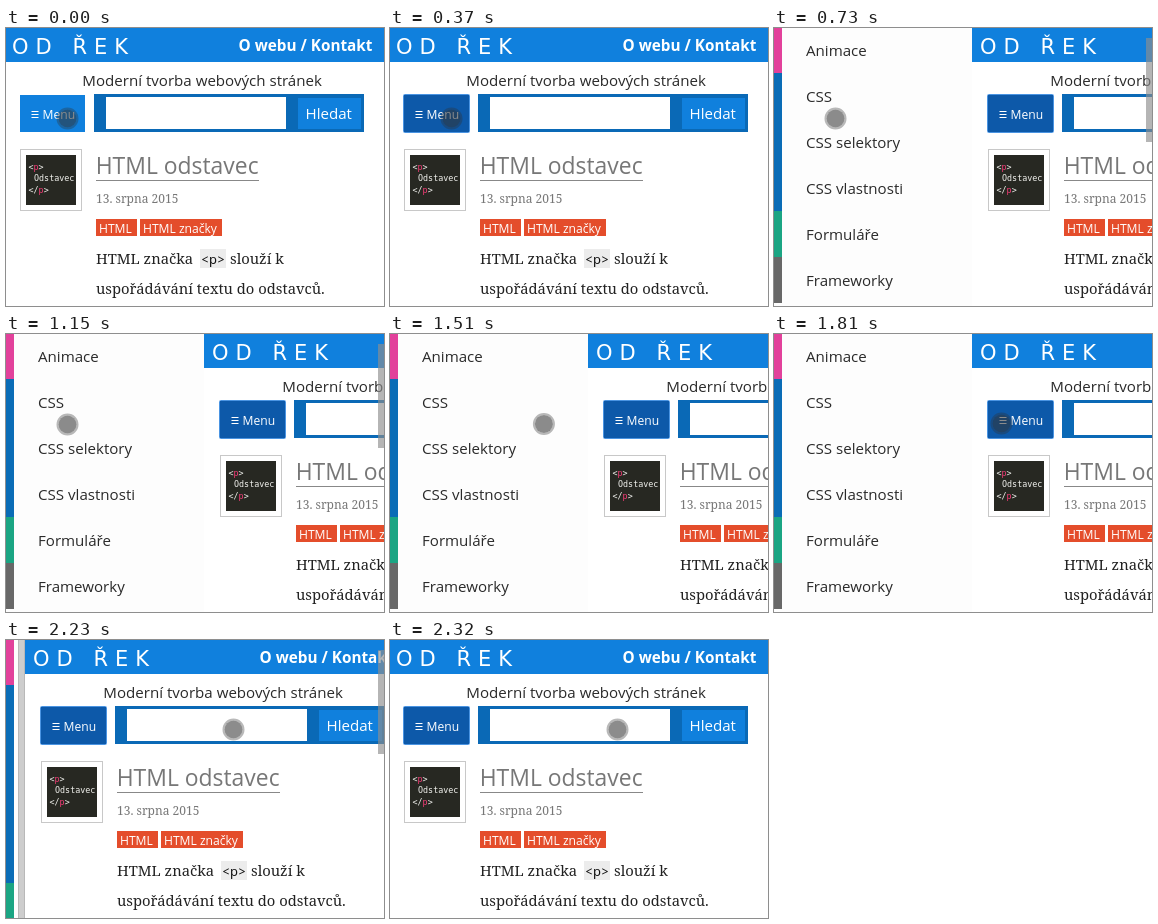
These frames come from a looping animation (378 px wide and 278 px high, 2720 ms). An HTML page:

```html
<!DOCTYPE html>
<html lang="cs">
<head>
<meta charset="utf-8">
<title>Vysouvací menu</title>
<style>
  html, body { margin: 0; width: 100%; height: 100%; overflow: hidden; background: #fff; }
  svg { display: block; width: 100vw; height: 100vh; }
  text { font-family: "Open Sans", "Noto Sans", sans-serif; font-size: 15.1px; fill: #2a2a2a; }
  .white { fill: #fff; font-weight: 500; }
  .logo { font-family: "DejaVu Sans", sans-serif; font-size: 21px; letter-spacing: 7px; }
  .nav { font-size: 15.3px; font-weight: 700; }
  .title { font-size: 22.9px; fill: #777; }
  .small { font-size: 12.1px; }
  .serif { font-family: "Noto Serif", serif; font-size: 14.75px; fill: #222; }
  .date { font-size: 12px; fill: #777; }
  .code { font-family: "Noto Sans Mono", "DejaVu Sans Mono", monospace; font-size: 13.3px; font-weight: 500; fill: #111; }
  .thumb { font-family: "DejaVu Sans Mono", monospace; font-size: 8.4px; fill: #f4f4f0; }
  .tag { fill: #f83c78; }
</style>
</head>
<body>
<svg viewBox="0 0 378 278">
  <rect width="378" height="278" fill="#fdfdfd"/>
  <g id="edge">
    <rect x="-9" width="7" height="278" fill="#b8b8b8"/>
    <rect x="-8" width="5" height="278" fill="#cdcdcd"/>
  </g>
  <g id="menu"></g>

  <g id="page">
    <rect x="-2" width="382" height="278" fill="#fff"/>
    <rect x="-2" width="382" height="34" fill="#1080dd"/>
    <text class="white logo" x="6" y="26">OD ŘEK</text>
    <text class="white nav" x="232.5" y="23">O webu / Kontakt</text>
    <text x="76.3" y="58">Moderní tvorba webových stránek</text>

    <rect id="button" x="14" y="67" width="65" height="37"/>
    <rect id="outline" x="13.5" y="66.5" width="66" height="38" rx="1" fill="none" stroke="#4a94e2"/>
    <path d="M25.5 83.5h7m-7 3h7m-7 3h7" stroke="#fff"/>
    <text class="white small" x="36.5" y="91">Menu</text>

    <rect x="88" y="66" width="270" height="38" fill="#0a69b6"/>
    <rect x="100" y="69" width="180" height="32" fill="#fff"/>
    <rect x="292" y="70" width="63" height="31" fill="#1080dd"/>
    <text class="white" x="299.5" y="91">Hledat</text>

    <rect x="14.5" y="121.5" width="61" height="61" fill="#fff" stroke="#c8c8c8"/>
    <rect x="20" y="127" width="50" height="50" fill="#272822"/>
    <text class="thumb" x="22.5" y="142">&lt;<tspan class="tag">p</tspan>&gt;</text>
    <text class="thumb" x="28" y="153">Odstavec</text>
    <text class="thumb" x="22.5" y="165">&lt;/<tspan class="tag">p</tspan>&gt;</text>

    <text class="title" x="89.7" y="146">HTML odstavec</text>
    <path d="M90 152.5h163" stroke="#888"/>
    <text class="serif date" x="90" y="175">13. srpna 2015</text>
    <path d="M90 191h41v17h-41zM134 191h82v17h-82z" fill="#e44d2b"/>
    <text class="white small" x="93" y="205">HTML</text>
    <text class="white small" x="137" y="205">HTML značky</text>

    <text class="serif" x="90" y="236">HTML značka</text>
    <rect x="194" y="221" width="26" height="19" fill="#ececec"/>
    <text class="code" x="195" y="236">&lt;p&gt;</text>
    <text class="serif" x="224" y="236">slouží k</text>
    <text class="serif" x="90" y="266">uspořádávání textu do odstavců.</text>
  </g>

  <rect id="scroll" x="372" y="10" width="6" height="104" fill="#8e8e8e" fill-opacity=".65"/>
  <g id="cursor" stroke="#323232">
    <circle r="9" fill="#323232" fill-opacity=".56" stroke="none"/>
    <circle r="10" fill="none" stroke-width="2" stroke-opacity=".34"/>
  </g>
</svg>
<script>
const LOOP = 2720, STEP = 30, OPEN = 200, LINE = 30, ITEM = 46;
const $ = id => document.getElementById(id);
const clamp = v => Math.min(1, Math.max(0, v));
const span = (t, from, to) => clamp((t - from) / (to - from));

function bezier(x1, y1, x2, y2) {
  const at = (a, b, s) => 3 * a * s * (1 - s) ** 2 + 3 * b * s * s * (1 - s) + s ** 3;
  return x => {
    if (x <= 0 || x >= 1) return clamp(x);
    let lo = 0, hi = 1;
    for (let i = 0; i < 24; i++) {
      const mid = (lo + hi) / 2;
      if (at(x1, x2, mid) < x) lo = mid; else hi = mid;
    }
    return at(y1, y2, lo);
  };
}
const easeOut = bezier(0, 0, .58, 1);
const ease = bezier(.25, .1, .25, 1);

// [colour, first word, second word, panel width below which it wraps]
const items = [
  ['#e2419b', 'Animace'],
  ['#0a6cb6', 'CSS'],
  ['#0a6cb6', 'CSS', 'selektory', 140],
  ['#0a6cb6', 'CSS', 'vlastnosti', 143],
  ['#1ba583', 'Formuláře'],
  ['#686868', 'Frameworky'],
].map(([color, first, second = '', wrap = 0]) => {
  const g = document.createElementNS('http://www.w3.org/2000/svg', 'g');
  g.innerHTML = `<rect width="8" fill="${color}"/>` +
    `<text x="32" y="29">${first} <tspan>${second}</tspan></text>`;
  $('menu').append(g);
  return { g, bar: g.querySelector('rect'), rest: g.querySelector('tspan'), wrap };
});

function layoutMenu(width) {
  let top = -1;
  for (const { g, bar, rest, wrap } of items) {
    const wrapped = width < wrap;
    const height = ITEM + (wrapped ? LINE : 0);
    g.setAttribute('transform', `translate(0 ${top})`);
    bar.setAttribute('height', height);
    if (wrapped) {
      rest.setAttribute('x', 32);
      rest.setAttribute('dy', LINE);
    } else {
      rest.removeAttribute('x');
      rest.removeAttribute('dy');
    }
    top += height;
  }
}

function draw(time) {
  const t = Math.floor((time - 10) / STEP) * STEP + 10;

  const shift = Math.round(OPEN * (easeOut(span(t, 478, 728)) - ease(span(t, 2085, 2320))));
  const moving = shift > 0 && shift < OPEN;
  layoutMenu(shift);
  for (const id of ['page', 'edge']) $(id).setAttribute('transform', `translate(${shift} 0)`);
  $('edge').setAttribute('opacity', moving ? 1 : 0);

  const focused = t >= 370, opening = moving && t < 1000;
  $('button').setAttribute('fill', opening ? '#0c4f96' : focused ? '#0d59a9' : '#1080dd');
  $('outline').setAttribute('opacity', focused ? 1 : 0);

  const fade = t < 2085 ? 1 - span(t, 1150, 1450) : 1;
  $('scroll').setAttribute('opacity', shift > 0 ? fade : 0);

  const p = span(t, 1150, 1810);
  const q = (p + p * p * (3 - 2 * p)) / 2;
  $('cursor').setAttribute('transform', `translate(${61.5 + 166 * q} ${90.5 - q})`);
}

const start = performance.now();
function tick() {
  draw((performance.now() - start) % LOOP);
  requestAnimationFrame(tick);
}
tick();
</script>
</body>
</html>
```
